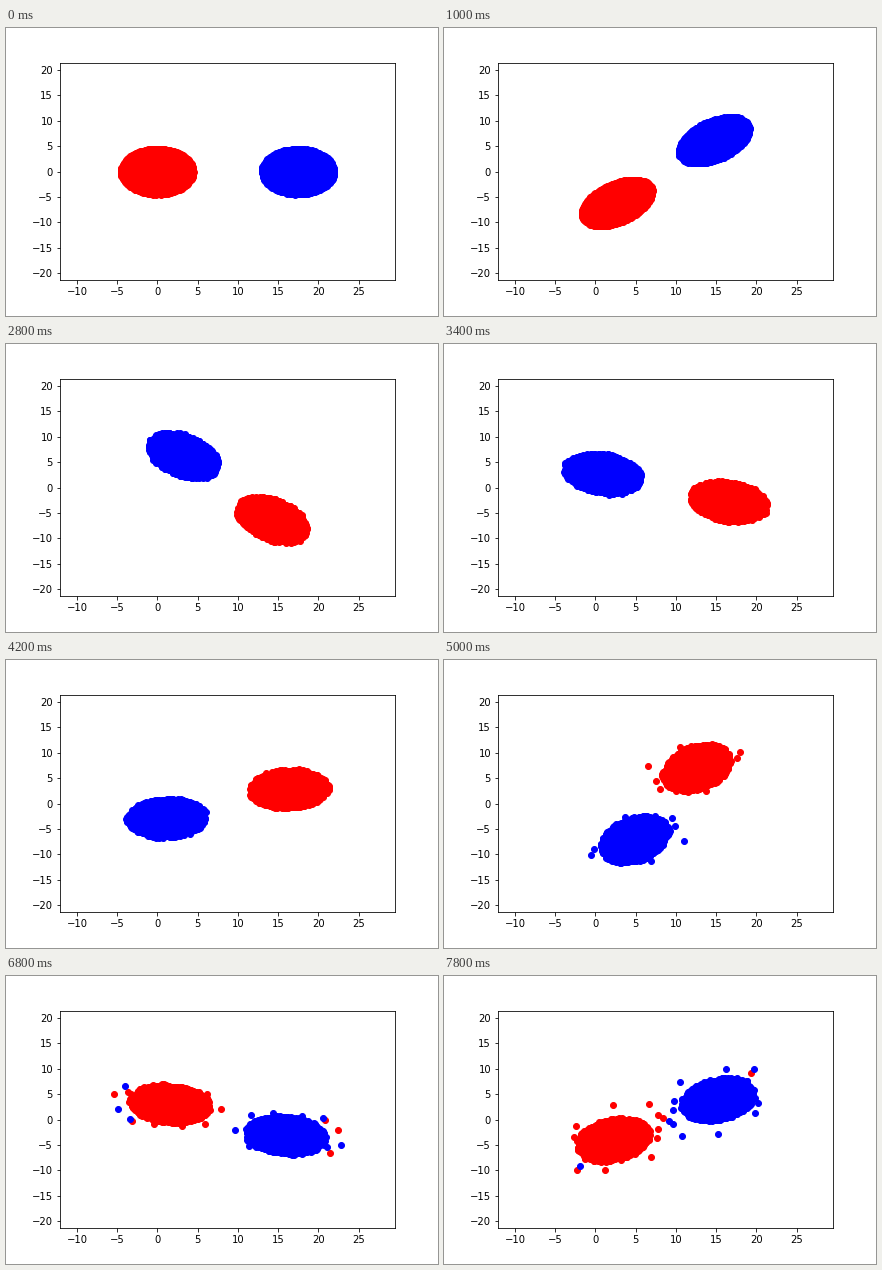
Write a matplotlib script that moves like this. It is 432 px wide and 288 px high and loops after 8000 ms.

```python
import numpy as np
import matplotlib.pyplot as plt
from matplotlib.animation import FuncAnimation

FRAMES, INTERVAL = 40, 200
COUNT = 2600
CENTRE = np.array([[8.73], [0.0]])
SPIN = 729  # angular momentum of a loose particle: degrees * radius^2 per step
MID = 34    # step at which the loose particles' radius and angle are given

# Loose particles: radius, drift per step, angle in degrees about their host
STAY = [
    (7.2, 0.05, 165), (5.8, 0.0, 216), (6.4, 0.4, 350), (4.95, 0.0, 24),
    (5.7, 0.08, 156), (5.9, 0.3, 317), (4.6, 0.58, 289), (4.2, 0.26, 205),
    (4.4, 0.32, 242),
]
# Those captured by the other body, with the step at which they return
CROSS = [(6.6, 0.0, 328, 50), (6.6, 0.05, 9, 35), (5.8, -0.1, 31, 35)]

rng = np.random.default_rng(4)
index = np.arange(COUNT)
rho = np.sqrt((index + 0.5) / COUNT)
phi = index * np.pi * (3 - np.sqrt(5))
jitter = np.clip(rng.normal(size=COUNT), -2.6, 2.6)
speed = np.radians(22) / (rho + 0.25) ** 1.2


def polar(r, a):
    return np.array([r * np.cos(a), r * np.sin(a)])


def smooth(x):
    x = np.clip(x, 0, 1)
    return x * x * (3 - 2 * x)


def disc(n, theta):
    """One disc about its own centre, stretched towards its companion."""
    rough = 0.042 * smooth(n / 16) + 0.012 * n / FRAMES
    x, y = polar(rho * (1 + rough * (jitter - 1.5)), phi + speed * n)
    ring = np.cos(2 * np.pi * n / 9.5) * np.exp(-n / 14)
    x, y = x * (5.15 - 0.6 * ring), y * (3.85 + 0.7 * ring)
    tilt = theta + 0.22 * smooth(n / 16) * np.cos(2 * np.pi * (n - 8) / 26)
    c, s = np.cos(tilt), np.sin(tilt)
    return np.array([c * x - s * y, s * x + c * y])


def loose(n, radius, drift, angle):
    """A particle that spirals out while keeping its angular momentum."""
    m = n - MID
    r = max(radius + drift * m, 2.5)
    a = np.radians(angle + SPIN * m / (radius * r))
    return polar(2.5 + (r - 2.5) * smooth((n - 18) / 9), a)


def red_points(n):
    """All red particles relative to the centre of mass."""
    theta = np.radians(n * (8.99 + 0.0267 * n))
    other = polar(8.75 - 0.028 * n, theta)
    host = -other
    parts = [disc(n, theta) + host[:, None]]
    for p in STAY:
        parts.append((host + loose(n, *p))[:, None])
    for *p, back in CROSS:
        w = smooth((n - 25) / 3.5) - smooth((n - back) / 3.5)
        parts.append((host + w * (other - host) + loose(n, *p))[:, None])
    return np.hstack(parts)


fig, ax = plt.subplots(figsize=(6, 4), dpi=72)
fig.subplots_adjust(left=0.125, right=0.9, bottom=0.125, top=0.88)
ax.set_xlim(-12.12, 29.51)
ax.set_ylim(-21.34, 21.46)
ax.set_xticks(range(-10, 26, 5))
ax.set_yticks(range(-20, 21, 5))
red, = ax.plot([], [], "o", color="red", ms=6)
blue, = ax.plot([], [], "o", color="blue", ms=6)


def update(n):
    pts = red_points(n)
    # The two sets mirror each other through the centre of mass
    red.set_data(*(CENTRE + pts))
    blue.set_data(*(CENTRE - pts))
    return red, blue


anim = FuncAnimation(fig, update, frames=FRAMES, interval=INTERVAL,
                     repeat=True, repeat_delay=0)
plt.show()
```
